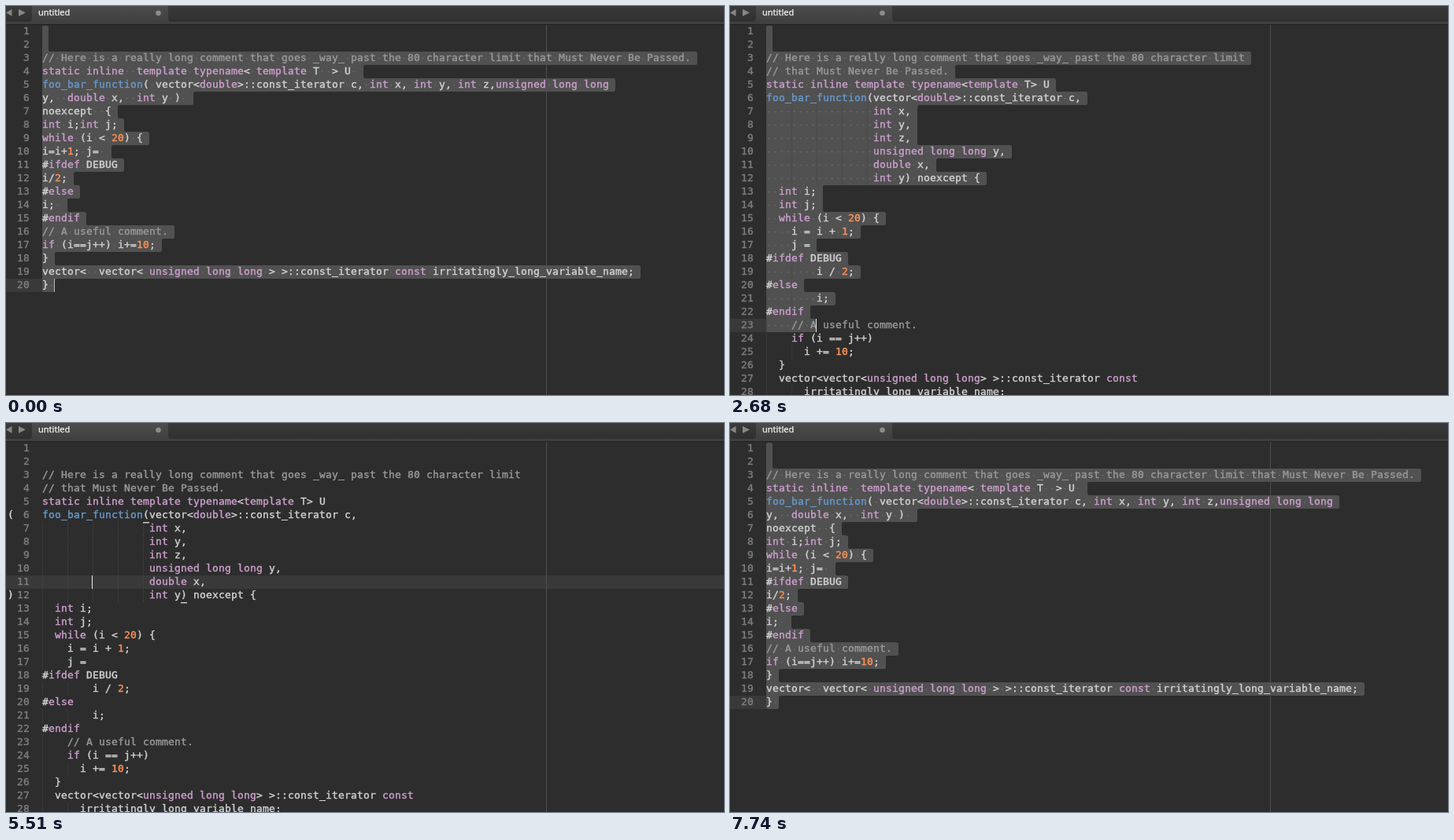
An HTML page for the animation above (8000 ms loop, 912x495 px).

```html
<!DOCTYPE html>
<html lang="en">
<head>
<meta charset="utf-8">
<title>Code formatting</title>
<style>
  html, body { margin: 0; width: 100%; height: 100%; overflow: hidden; background: #2d2d2d; }
  svg { display: block; width: 912px; height: 495px; }
  .code { font: 13px "DejaVu Sans Mono", monospace; }
  .code text { fill: var(--ink); stroke: var(--ink); stroke-width: .4px; }
  .plain { --ink: #d2d2d2; }
  .comment { --ink: #999; }
  .keyword { --ink: #cc9fcc; }
  .func { --ink: #69c; }
  .number { --ink: #f99157; }
  .lineno { --ink: #7d7d7d; }
  .mark { --ink: #ddd; }
  .underline { fill: #d2d2d2; }
  .sel { fill: #515151; }
  .dot { fill: #787878; }
  .guide { stroke: #444; stroke-dasharray: 1 1; }
  .tab { font: 500 11px "Noto Sans", sans-serif; fill: #f4f4f4; stroke: #f4f4f4; stroke-width: .25px; }
</style>
</head>
<body>
<svg viewBox="0 0 912 495">
  <defs>
    <linearGradient id="bar" x2="0" y2="1">
      <stop stop-color="#3a3a3a"/><stop offset="1" stop-color="#303030"/>
    </linearGradient>
    <linearGradient id="tab" x2="0" y2="1">
      <stop stop-color="#4c4c4c"/><stop offset="1" stop-color="#404040"/>
    </linearGradient>
  </defs>
  <rect width="912" height="495" fill="#2d2d2d"/>
  <rect id="row" height="17" fill="#393939"/>
  <path d="M686.5 24V495" stroke="#505050"/>
  <g id="docs" class="code"></g>
  <g id="marks" class="code"></g>
  <rect id="caret" width="1" height="17" fill="#e6e6e6"/>
  <rect width="912" height="20" fill="url(#bar)"/>
  <rect y="20" width="912" height="3" fill="#404040"/>
  <rect y="23" width="912" height="1" fill="#232323"/>
  <path d="M31 20Q33 19 33 15V0H206V15Q206 19 208 20Z" fill="url(#tab)"/>
  <path d="M0 8.5L7.5 4V13ZM25 8.5L16 4V13Z" fill="#868686"/>
  <text class="tab" x="41" y="12">untitled</text>
  <circle cx="193.5" cy="9" r="3.3" fill="#8c8c8c"/>
</svg>
<script>
const LEFT = 46, CHAR = 8, LINE = 17, BASE = 12, LOOP = 8000;
const $ = id => document.getElementById(id);
const colX = col => LEFT + col * CHAR;
const rowY = line => 24 + (line - 1) * LINE;

const messy = `

// Here is a really long comment that goes _way_ past the 80 character limit that Must Never Be Passed.
static inline  template typename< template T  > U 
foo_bar_function( vector<double>::const_iterator c, int x, int y, int z,unsigned long long
y,  double x,  int y ) 
noexcept  {
int i;int j;
while (i < 20) {
i=i+1; j= 
#ifdef DEBUG
i/2;
#else
i; 
#endif
// A useful comment.
if (i==j++) i+=10;
}
vector<  vector< unsigned long long > >::const_iterator const irritatingly_long_variable_name;
} `.split("\n");

const args = ["int x,", "int y,", "int z,", "unsigned long long y,", "double x,", "int y) noexcept {"];
const tidy = `

// Here is a really long comment that goes _way_ past the 80 character limit
// that Must Never Be Passed.
static inline template typename<template T> U
foo_bar_function(vector<double>::const_iterator c,
${args.map(a => " ".repeat(17) + a).join("\n")}
  int i;
  int j;
  while (i < 20) {
    i = i + 1;
    j =
#ifdef DEBUG
        i / 2;
#else
        i;
#endif
    // A useful comment.
    if (i == j++)
      i += 10;
  }
  vector<vector<unsigned long long> >::const_iterator const
      irritatingly_long_variable_name;`.split("\n");

const TOKEN = new RegExp([
  "(?<comment>\\/\\/.*)",
  "(?<keyword>\\b(?:static|inline|template|typename|double|int|unsigned|long|while|if|const|ifdef|else|endif)\\b)",
  "(?<func>foo_bar_function)",
  "(?<number>\\b\\d+\\b)",
  "(?<plain>\\w+|[^\\w\\s])"
].join("|"), "g");

const escapeText = s => s.replace(/&/g, "&amp;").replace(/</g, "&lt;");

// Every glyph sits on the 8 px grid.
function glyphs(s, x, line, cls, step = CHAR) {
  const xs = [...s].map((_, i) => x + i * step).join(" ");
  return `<text class="${cls}" x="${xs}" y="${rowY(line) + BASE}">${escapeText(s)}</text>`;
}

function codeLine(s, line) {
  let out = glyphs(String(line), 30 - CHAR * String(line).length, line, "lineno");
  for (const m of s.matchAll(TOKEN)) {
    const cls = Object.keys(m.groups).find(k => m.groups[k]);
    out += glyphs(m[0], colX(m.index), line, cls);
  }
  return out;
}

function guides(s, line) {
  const indent = s.search(/\S/);
  let d = "";
  for (let c = 0; c < indent; c += 4) d += `M${colX(c) + .5} ${rowY(line)}v${LINE}`;
  return d && `<path class="guide" d="${d}"/>`;
}

// Outline of the selected lines with rounded corners.
function outline(ends) {
  const pts = [[LEFT, rowY(1) + 1]];
  ends.forEach((end, i) => {
    if (end === ends[i - 1]) pts.pop();
    else pts.push([colX(end), i ? rowY(i + 1) : rowY(1) + 1]);
    pts.push([colX(end), rowY(i + 2)]);
  });
  pts.push([LEFT, rowY(ends.length + 1)]);
  const toward = (a, b) => a.map((v, k) => v + Math.sign(b[k] - v) * 2.5);
  return pts.map((p, i) => {
    const prev = pts.at(i - 1), next = pts[(i + 1) % pts.length];
    return `${i ? "L" : "M"}${toward(p, prev)}Q${p} ${toward(p, next)}`;
  }).join("") + "Z";
}

function selection(lines, endLine, endCol) {
  const ends = lines.slice(0, endLine).map((s, i) => i + 1 === endLine ? endCol : s.length + 1);
  let dots = "";
  ends.forEach((end, i) => {
    for (const m of lines[i].slice(0, end).matchAll(/ /g))
      dots += `<rect class="dot" x="${colX(m.index) + 3}" y="${rowY(i + 1) + 8}" width="1.2" height="1.2"/>`;
  });
  return `<path class="sel" d="${outline(ends)}"/>${dots}`;
}

function buildDoc(id, lines, endLine, endCol) {
  $("docs").innerHTML += `<g id="${id}"><g id="${id}Sel">${selection(lines, endLine, endCol)}</g>` +
    lines.map((s, i) => guides(s, i + 1) + codeLine(s, i + 1)).join("") + "</g>";
}
buildDoc("messy", messy, 20, 2);
buildDoc("tidy", tidy, 23, 8);

// Matched brackets as [character, line, column].
const pairs = {
  cond: [["(", 24, 7], [")", 24, 16]],
  loop: [["{", 15, 17], ["}", 26, 2]],
  body: [["{", 12, 33]],
  params: [["(", 6, 16], [")", 12, 22]]
};

function bracketMarks(name) {
  const pair = pairs[name] || [];
  const sameLine = pair.length > 1 && pair[0][1] === pair[1][1];
  return pair.map(([ch, line, col], i) =>
    glyphs(ch, sameLine ? i * 7 - 1 : 2, line, "mark") +
    `<rect class="underline" x="${colX(col)}" y="${rowY(line + 1)}" width="8" height="1.4"/>`).join("");
}

// [start, document, selected, line, column, bracket pair]
const moves = [
  [0, "messy", true, 20, 2],
  [1340, "tidy", true, 23, 8],
  [2830, "tidy", false, 24, 8, "cond"],
  [3130, "tidy", false, 25, 8, "loop"],
  [3430, "tidy", false, 26, 3, "body"],
  [4470, "tidy", false, 25, 8, "loop"],
  [4770, "tidy", false, 24, 8, "cond"],
  [5220, "tidy", false, 21, 8, "cond"],
  [5370, "tidy", false, 16, 8, "cond"],
  [5510, "tidy", false, 11, 8, "params"],
  [7140, "messy", true, 20, 2]
];

// Caret opacity: [start, value]
const DIM = .7;
const blinks = [
  [0, DIM], [150, 0], [440, 1], [1040, DIM], [1190, 0], [1340, 1],
  [1780, DIM], [1930, 0], [2380, .5], [2530, DIM], [2680, 1],
  [3730, DIM], [3880, 0], [4470, 1], [5960, DIM], [6100, 0],
  [6400, DIM], [6550, 1], [6990, DIM], [7140, 1], [7590, DIM], [7740, 0]
];

const at = (list, t) => list.findLast(item => item[0] <= t);
let current;

function draw(t) {
  $("caret").setAttribute("opacity", at(blinks, t)[1]);
  const move = at(moves, t);
  if (move === current) return;
  current = move;
  const [, doc, selected, line, col, pair] = move;
  for (const id of ["messy", "tidy"]) $(id).style.display = id === doc ? "" : "none";
  $(doc + "Sel").style.display = selected ? "" : "none";
  $("row").setAttribute("y", rowY(line));
  $("row").setAttribute("width", selected ? LEFT : 912);
  $("caret").setAttribute("x", colX(col) - 1);
  $("caret").setAttribute("y", rowY(line));
  $("marks").innerHTML = bracketMarks(pair);
}

const start = performance.now();
function tick() {
  draw((performance.now() - start) % LOOP);
  requestAnimationFrame(tick);
}
tick();
</script>
</body>
</html>
```
